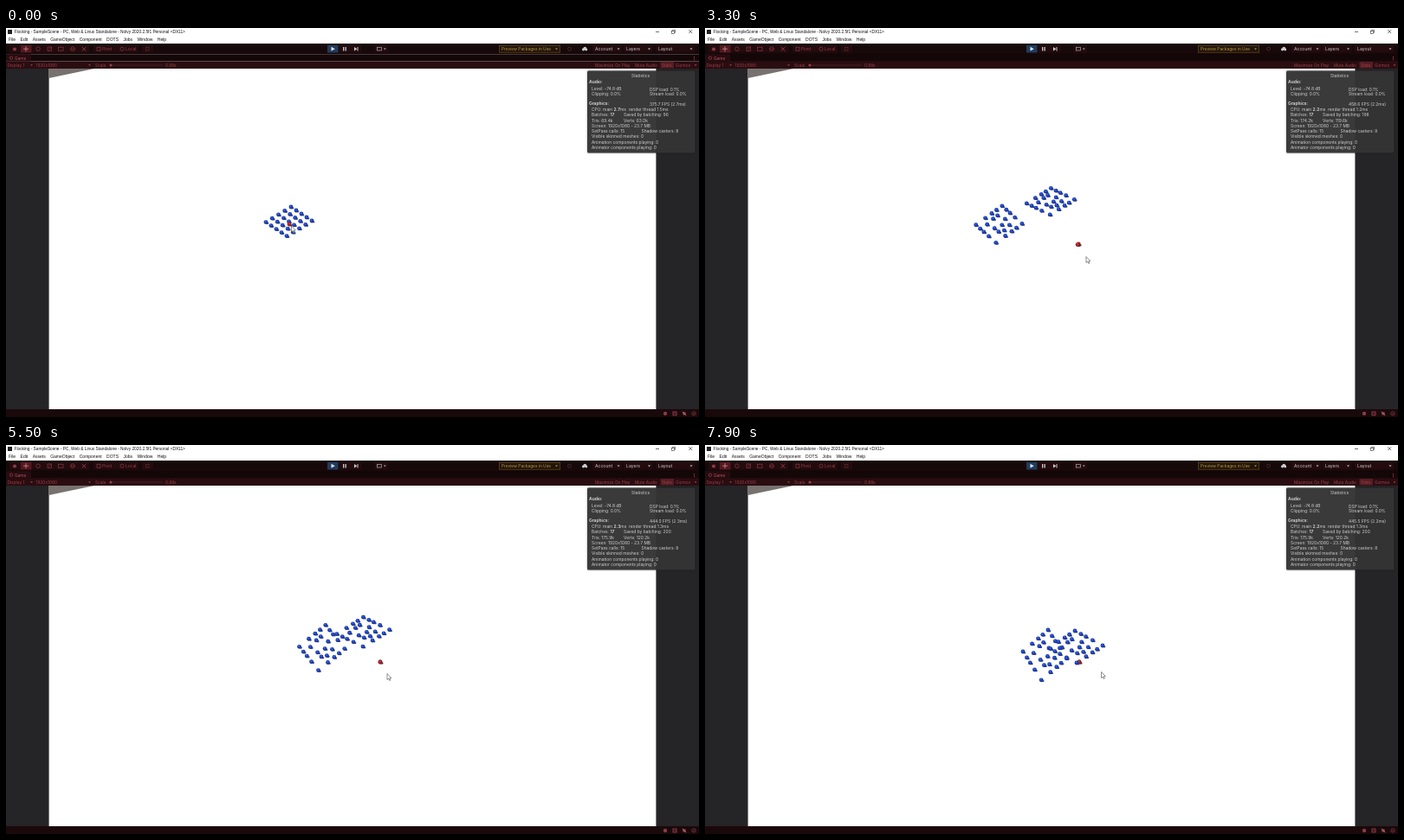
These frames come from a looping animation (800x450 px, 8000 ms). An HTML page with a canvas:

```html
<!DOCTYPE html>
<html lang="en">
<head>
<meta charset="utf-8">
<title>Flocking</title>
<style>
html, body { margin: 0; width: 100%; height: 100%; overflow: hidden; background: #fff; }
canvas { display: block; width: 800px; height: 450px; }
</style>
</head>
<body>
<canvas id="stage" width="800" height="450"></canvas>
<script>
const c = document.getElementById('stage').getContext('2d');
const LOOP = 8000;
const UI = 'Inter, "Liberation Sans", sans-serif';
const SYS = '"Liberation Sans", Arial, sans-serif';
const RED = '#9c3f48', ICON = '#8c3a43', LIGHT = '#ccc', BUTTON = '#230b0e';

const clamp = v => Math.max(0, Math.min(1, v));
const mix = (a, b, k) => a + (b - a) * k;
const ease = k => k * k * (3 - 2 * k);

function box(x, y, w, h, color) {
  c.fillStyle = color;
  c.fillRect(x, y, w, h);
}
function path(points, color, stroke, width = 0.7) {
  c.beginPath();
  points.forEach(([x, y]) => c.lineTo(x, y));
  if (color) { c.closePath(); c.fillStyle = color; c.fill(); }
  if (stroke) { c.strokeStyle = stroke; c.lineWidth = width; c.stroke(); }
}
const line = (x1, y1, x2, y2, color, width) => path([[x1, y1], [x2, y2]], null, color, width);
function cross(x, y, r, color, width) {
  line(x - r, y - r, x + r, y + r, color, width);
  line(x + r, y - r, x - r, y + r, color, width);
}
function frame(x, y, w, h, color, width = 0.7) {
  c.strokeStyle = color;
  c.lineWidth = width;
  c.strokeRect(x, y, w, h);
}
function disc(x, y, r, color) {
  c.beginPath();
  c.arc(x, y, r, 0, 7);
  c.fillStyle = color;
  c.fill();
}
function ring(x, y, r, color) {
  c.beginPath();
  c.arc(x, y, r, 0, 7);
  c.strokeStyle = color;
  c.lineWidth = 0.7;
  c.stroke();
}
const caret = (x, y, color) => path([[x - 1.5, y - 0.8], [x + 1.5, y - 0.8], [x, y + 1]], color);

// Parts between asterisks are bold.
function text(s, x, y, color, size = 4.8, family = UI) {
  c.fillStyle = color;
  s.split('*').forEach((part, i) => {
    c.font = `${i % 2 ? 700 : 400} ${size}px ${family}`;
    c.fillText(part, x, y);
    x += c.measureText(part).width;
  });
}

function titleBar() {
  box(0, 0, 800, 18, '#fff');
  box(2, 2, 5, 5, '#222');
  text('Flocking - SampleScene - PC, Web & Linux Standalone - Nolvy 2020.2.5f1 Personal <DX11>', 9.5, 6.4, '#111', 4.8, SYS);
  let x = 3;
  for (const name of ['File', 'Edit', 'Assets', 'GameObject', 'Component', 'DOTS', 'Jobs', 'Window', 'Help']) {
    text(name, x, 15.4, '#111', 5, SYS);
    x += c.measureText(name).width + 5.5;
  }
  line(750, 4.5, 754, 4.5, '#333');
  frame(768.5, 3.3, 3, 3, '#333', 0.6);
  path([[769.5, 3.3], [769.5, 2.3], [772.5, 2.3], [772.5, 5.3], [771.5, 5.3]], null, '#333', 0.6);
  cross(790.2, 4.2, 1.9, '#333');
}

function toolbar() {
  box(0, 18, 800, 12.3, '#17080a');
  box(4, 20, 92, 8.5, BUTTON);
  box(17, 20, 12.5, 8.5, '#55181f');
  disc(10, 24.5, 2.1, ICON);
  line(20, 24.2, 26, 24.2, '#d8a0a5');
  line(23, 21.2, 23, 27.2, '#d8a0a5');
  ring(37, 24.2, 2.3, ICON);
  frame(48, 22, 4.5, 4.5, ICON);
  line(49, 25.5, 52.5, 22, ICON);
  frame(60.5, 22.2, 5.5, 4, ICON);
  ring(77, 24.2, 2.4, ICON);
  line(74.5, 24.2, 79.5, 24.2, ICON);
  cross(90, 24.3, 2.3, ICON, 1);
  box(101, 20, 52, 8.5, BUTTON);
  box(157, 20, 13, 8.5, BUTTON);
  frame(105, 22.2, 4, 4, ICON);
  text('Pivot', 111, 26, RED);
  ring(134, 24.2, 2.1, ICON);
  text('Local', 138, 26, RED);
  frame(161.5, 22.5, 3.5, 3.5, '#60282e');

  box(371, 20, 12.5, 8.5, '#213c5c');
  box(384.5, 20, 26, 8.5, BUTTON);
  path([[375.5, 21.8], [375.5, 26.6], [379.8, 24.2]], '#d9e7f8');
  box(389, 22, 1.3, 4.5, LIGHT);
  box(391.5, 22, 1.3, 4.5, LIGHT);
  path([[402, 22], [402, 26.5], [405.3, 24.2]], LIGHT);
  box(405.5, 22, 1, 4.5, LIGHT);
  box(425, 20, 16, 8.5, BUTTON);
  frame(428.5, 22.3, 5, 3.7, '#aaa');
  caret(437.3, 24.3, '#aaa');

  box(569, 20, 71, 8.5, '#22140b');
  frame(569.3, 20.3, 70.4, 7.9, '#685019', 0.6);
  text('Preview Packages in Use', 572, 26, '#b99a42');
  caret(635.5, 24.3, '#b99a42');
  ring(650.5, 24.2, 2, '#573037');
  disc(666.5, 24.8, 1.6, LIGHT);
  disc(668.3, 23.7, 1.9, LIGHT);
  disc(669.8, 25, 1.4, LIGHT);
  [['Account', 680, 707], ['Layers', 716, 742.5], ['Layout', 753, 791]].forEach(([s, x, end]) => {
    box(x - 3, 20, end - x + 7, 8.5, BUTTON);
    text(s, x, 26, LIGHT, 5.1);
    caret(end, 24.3, LIGHT);
  });
}

function gameTab() {
  box(0, 30.3, 800, 8.2, '#140708');
  box(0, 30.3, 29, 8.2, '#260c10');
  ring(6, 34.7, 1.7, RED);
  text('Game', 10, 36.5, '#b8555e');
  for (let y = 33; y < 37; y += 1.6) box(794, y, 1, 1, RED);
  box(0, 38.5, 800, 8.5, '#2a0d11');
  box(755.5, 39, 15.5, 7.5, '#541d24');
  [['Display 1', 1.5], ['1920x1080', 34.5], ['Scale', 103], ['0.88x', 184], ['Maximize On Play', 680],
   ['Mute Audio', 726], ['Stats', 757], ['Gizmos', 773]].forEach(([s, x]) => text(s, x, 44.6, RED));
  [29.5, 96.5, 796].forEach(x => caret(x, 43, RED));
  line(120, 43, 181, 43, '#57262c');
  disc(121, 43, 1.6, RED);
}

function viewport() {
  box(0, 47, 800, 394, '#252427');
  box(49.6, 47, 700.8, 394, '#fff');
  path([[49.6, 47], [102, 47], [49.6, 58]], '#77726f');
}

function statusBar() {
  box(0, 441, 800, 9, '#1a090b');
  disc(761, 446, 2.2, ICON);
  frame(770, 444, 4, 4, ICON, 1);
  line(770, 446, 774, 446, ICON);
  disc(783, 446, 2, ICON);
  line(780.8, 443.7, 785.4, 448.4, '#c98c91');
  ring(794, 446, 2.2, ICON);
  path([[792.8, 446], [793.8, 447], [795.3, 445]], null, ICON, 0.6);
}

const SPAWN = 600;   // second flock appears
const FPS = [375.7, 322.2, 428.7, 458.6, 444, 395.8, 445.5];

function statistics(t) {
  const fps = FPS[Math.round(t / 1300)] ?? FPS.at(-1);
  const ms = 1000 / fps;
  const both = t >= SPAWN;
  const saved = both ? Math.min(200, Math.round(193 + (t - 1300) / 400)) : 96;
  const tris = both ? 175.9 - 0.83 * (200 - saved) : 69.4;
  const verts = both ? 120.2 - 0.28 * (200 - saved) : 63;
  c.save();
  c.shadowColor = 'rgba(0,0,0,.5)';
  c.shadowBlur = 2;
  c.fillStyle = 'rgba(54,54,54,.94)';
  c.beginPath();
  c.roundRect(671, 49.5, 124.5, 95, 1.5);
  c.fill();
  c.restore();

  const put = (s, x, y) => text(s, x, y, '#cfcfcf', 4.9);
  put('Statistics', 722, 56.5);
  put('*Audio:*', 673, 64);
  put('Level: -74.8 dB', 676, 71.5);
  put(`DSP load: ${both && t < 3300 ? 0.2 : 0.1}%`, 743, 72.7);
  put('Clipping: 0.0%', 676, 77.7);
  put('Stream load: 0.0%', 743, 78.2);
  put('*Graphics:*', 673, 88.5);
  put(`${fps.toFixed(1)} FPS (${ms.toFixed(1)}ms)`, 743, 89.5);
  [`CPU: main *${ms.toFixed(1)}*ms  render thread ${(ms * 0.56).toFixed(1)}ms`,
   'Batches: *17*',
   `Tris: ${tris.toFixed(1)}k`,
   'Screen: 1920x1080 - 23.7 MB',
   'SetPass calls: 15',
   'Visible skinned meshes: 0',
   'Animation components playing: 0',
   'Animator components playing: 0'].forEach((s, i) => put(s, 676, 96 + 6.26 * i));
  put(`Saved by batching: ${saved}`, 713, 102.3);
  put(`Verts: ${verts.toFixed(1)}k`, 713, 108.5);
  put('Shadow casters: 8', 733.5, 121);
}

// A pose is the grid's far corner, its step along a row and its step between rows.
const POSE_TIMES = [2200, 4100, 7900];
const FLOCKS = [
  { born: 0, leader: [327, 227], poses: [
    [329, 207, 6, 4, -7.25, 4.4],
    [353, 205, 5.6, 6, -7.75, 6.25],
    [396, 214, 5.3, 8.2, -7.25, 6.25]] },
  { born: SPAWN, leader: [393, 196], poses: [
    [393, 179, 6, 3.25, -6, 3.9],
    [404, 190, 7.25, 3.25, -7.75, 4.75],
    [427, 215, 8, 4.25, -7.5, 5]] }
];

function poseAt(poses, t) {
  const i = t < POSE_TIMES[1] ? 0 : 1;
  const k = (t - POSE_TIMES[i]) / (POSE_TIMES[i + 1] - POSE_TIMES[i]);
  return poses[i].map((v, n) => mix(v, poses[i + 1][n], Math.max(0, k)));
}

const noise = n => { const s = Math.sin(n * 12.9898) * 43758.5453; return s - Math.floor(s) - 0.5; };

// The rim bunches up along its edges while the inside scatters a little.
function boids({ born, poses }, t) {
  const [x, y, ix, iy, jx, jy] = poseAt(poses, t);
  const loose = 1 - Math.exp((born - t) / 900);
  const bunch = k => k - loose * 0.85 * Math.sin(Math.PI * k / 4) * k / 4;
  return Array.from({ length: 25 }, (_, n) => {
    let i = n % 5, j = Math.floor(n / 5);
    if (i % 4 && j % 4) {
      i += noise(n + 1) * 0.7 * loose;
      j += noise(n + 31) * 0.7 * loose;
    } else {
      i = bunch(i);
      j = bunch(j);
    }
    return [x + ix * i + jx * j, y + iy * i + jy * j];
  });
}

function ball([x, y, red]) {
  c.beginPath();
  c.ellipse(x + 1.4, y + 1.1, 2, 1.2, 0.2, 0, 7);
  c.fillStyle = red ? '#4a3034' : '#465070';
  c.fill();
  const g = c.createRadialGradient(x - 0.5, y - 1, 0.2, x, y, 2.5);
  g.addColorStop(0, red ? '#cc4450' : '#3a68dc');
  g.addColorStop(0.55, red ? '#a81f2c' : '#1a40c0');
  g.addColorStop(1, red ? '#701620' : '#0d2380');
  disc(x, y, 2.4, g);
}

function flocks(t) {
  const lead = t < 1900 ? 0 : 1 - Math.exp((1900 - t) / 350);
  FLOCKS.filter(f => t >= f.born)
    .flatMap(f => [...boids(f, t), [mix(f.leader[0], 432, lead), mix(f.leader[1], 251, lead), true]])
    .sort((a, b) => a[1] - b[1])
    .forEach(ball);
}

// start, x, y
const GLIDES = [[0, 392, 195], [650, 432.5, 252], [2700, 440, 264.5], [5700, 434, 267.5], [7000, 457.5, 262.5]];

function pointer(t) {
  let x = 329.5, y = 229;
  for (const [start, toX, toY] of GLIDES) {
    const k = ease(clamp((t - start) / 550));
    x = mix(x, toX, k);
    y = mix(y, toY, k);
  }
  c.save();
  c.translate(x, y);
  path([[0, 0], [0, 7], [1.6, 5.6], [2.8, 8], [3.8, 7.5], [2.8, 5.2], [4.8, 5], [0, 0]], '#fff', '#444', 0.6);
  c.restore();
}

function draw(t) {
  titleBar();
  toolbar();
  gameTab();
  viewport();
  statusBar();
  flocks(t);
  statistics(t);
  pointer(t);
}

let begin;
function tick(now) {
  begin ??= now;
  draw((now - begin) % LOOP);
  requestAnimationFrame(tick);
}
requestAnimationFrame(tick);
</script>
</body>
</html>
```
